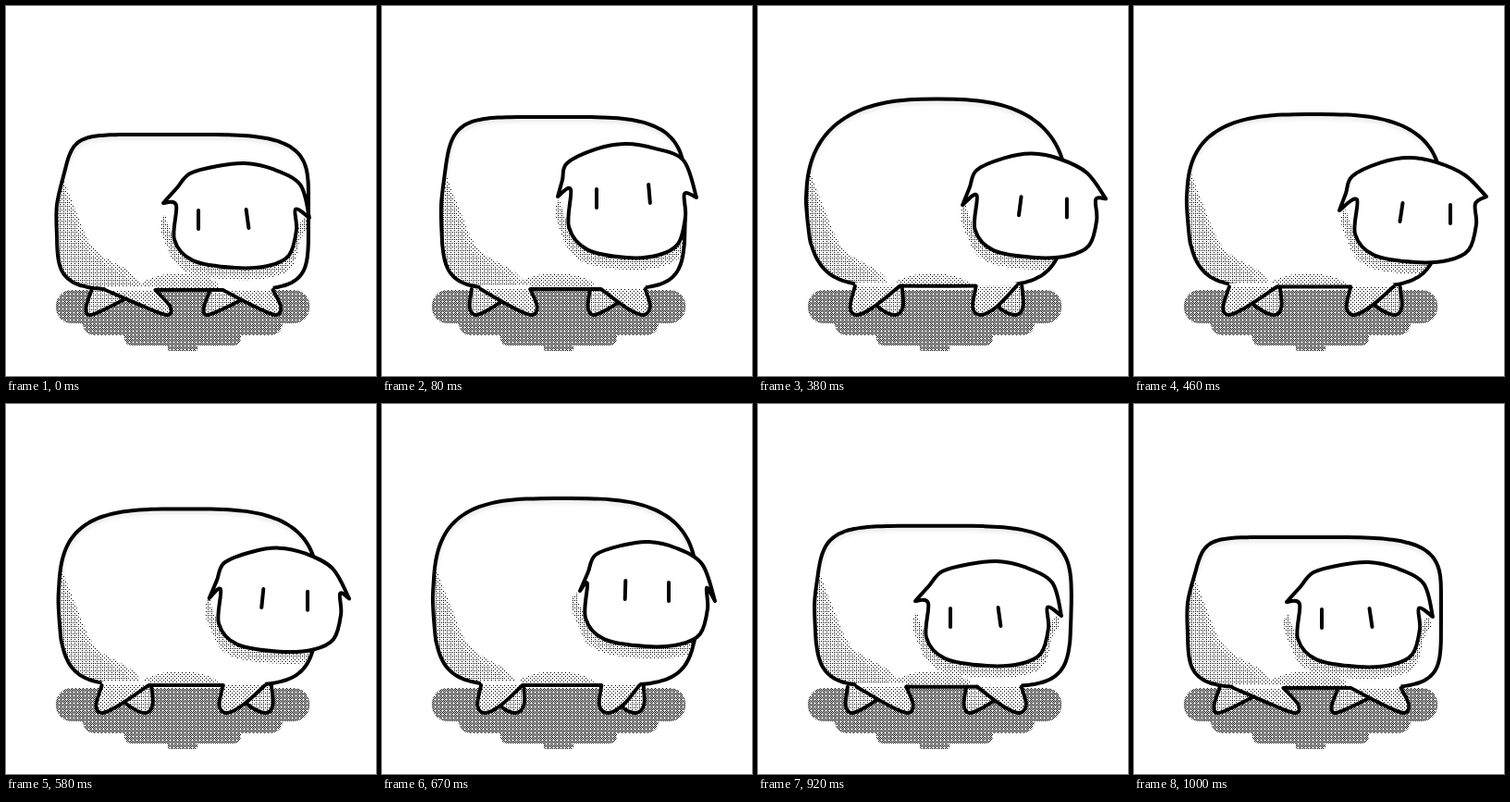
Recreate the animation shown at these times as an HTML page with a canvas. Size 400 px wide and 400 px high, loop 1.04 s.

```html
<!DOCTYPE html>
<html lang="en">
<head>
<meta charset="utf-8">
<title>Walking sheep</title>
<style>
html, body { margin: 0; width: 100%; height: 100%; overflow: hidden; background: #fff; }
canvas { display: block; }
</style>
</head>
<body>
<canvas id="stage" width="400" height="400"></canvas>
<script>
const ctx = document.getElementById('stage').getContext('2d');
const LOOP = 1040, TICKS = 25, DRAWINGS = 23, TURN = 10;
const mix = (a, b, u) => a + (b - a) * u;

// Body: drawing, [left, right, top, boxiness]
const bodyKeys = [
  [0, [55, 327, 139, 1]], [2, [64, 328, 120, 0.8]], [5, [46, 337, 76, 0]], [10, [57, 333, 117, 0.3]],
  [15, [55, 341, 102, 0.4]], [16.5, [53, 342, 73, 0]], [18, [62, 344, 112, 0.4]], [22, [58, 332, 144, 1]]
];

// Head: face left, top, right, bottom; then points: ear tips, crown corners, eyes
const headDown = [181, 170, 314, 283, 170, 213, 328, 229, 199, 181, 318, 193, 208, 231, 261, 230];
const headPoses = [
  [0, [238, 164, 370, 277, 222, 221, 381, 206, 236, 184, 358, 183, 289, 223, 342, 225]],
  [5, [219, 149, 352, 262, 214, 202, 360, 213, 231, 163, 346, 173, 263, 201, 310, 203]],
  [8, [201, 149, 328, 272, 190, 206, 340, 207, 200, 170, 326, 167, 232, 208, 289, 203]],
  [10, headDown],
  [11, headDown.map((v, i) => i % 2 ? v + 1 : v - 5)]
];
// The head swings back through the same poses
const headKeys = headPoses
  .flatMap(([gap, pose]) => (gap ? [TURN - gap, TURN + gap] : [TURN]).map(at => [(at + DRAWINGS) % DRAWINGS, pose]))
  .sort((a, b) => a[0] - b[0]);

// Cyclic cubic interpolation between poses
function poseAt(keys, time) {
  const n = keys.length;
  const key = i => [keys[(i + n) % n][0] + Math.floor(i / n) * DRAWINGS, keys[(i + n) % n][1]];
  let k = n - 1;
  while (keys[k][0] > time) k--;
  const [[ta, a], [tb, b], [tc, c], [td, d]] = [k - 1, k, k + 1, k + 2].map(key);
  const span = tc - tb, u = (time - tb) / span;
  return b.map((v, i) => {
    const m0 = (c[i] - a[i]) / (tc - ta) * span, m1 = (d[i] - v) / (td - tb) * span;
    return mix(v, c[i], u * u * (3 - 2 * u)) + m0 * u * (1 - u) ** 2 - m1 * u * u * (1 - u);
  });
}

// Smooth curve through points
function curve(points, closed = false, path = new Path2D()) {
  const n = points.length;
  const at = i => closed ? points[(i + n) % n] : points[Math.max(0, Math.min(n - 1, i))];
  path.moveTo(...at(0));
  for (let i = 0; i < n - (closed ? 0 : 1); i++) {
    const [a, b, c, d] = [at(i - 1), at(i), at(i + 1), at(i + 2)];
    path.bezierCurveTo(b[0] + (c[0] - a[0]) / 6, b[1] + (c[1] - a[1]) / 6,
      c[0] - (d[0] - b[0]) / 6, c[1] - (d[1] - b[1]) / 6, ...c);
  }
  if (closed) path.closePath();
  return path;
}

// Ordered halftone with the given number of black dots in each 4 by 4 cell
function halftone(level) {
  const tile = document.createElement('canvas');
  tile.width = tile.height = 4;
  const t = tile.getContext('2d');
  const quad = (x, y) => [0, 2, 3, 1][(y & 1) * 2 + (x & 1)];
  for (let y = 0; y < 4; y++) {
    for (let x = 0; x < 4; x++) {
      if (quad(x, y) * 4 + quad(x >> 1, y >> 1) < level) t.fillRect(x, y, 1, 1);
    }
  }
  return ctx.createPattern(tile, 'repeat');
}
const [light, mid, dark] = [2, 3, 7].map(halftone);

const ground = new Path2D();
for (const [half, bottom] of [[137, 343], [108, 356], [63, 367], [16, 373]]) {
  ground.roundRect(191 - half, 307, half * 2, bottom - 307, half / 8);
}

function fill(path, style) {
  ctx.fillStyle = style;
  ctx.fill(path);
}

function ink(path, width = 4, style = '#000') {
  ctx.strokeStyle = style;
  ctx.lineWidth = width;
  ctx.stroke(path);
}

function drawLeg(hip, swing, y, near) {
  const half = 15 + Math.min(12, Math.abs(swing) / 2);
  const foot = hip + swing;
  const root = hip + swing * (near ? 0.1 : 0.3);
  const path = curve([[root - half, y], [foot - 13, 326], [foot + swing * 0.3, 334], [foot + 13, 325], [root + half, y]]);
  fill(path, '#fff');
  if (near) {
    // Opens the belly line where the leg joins
    const join = new Path2D();
    join.moveTo(root - half, y);
    join.lineTo(root + half, y);
    ctx.lineCap = 'butt';
    ink(join, 8, '#fff');
    ctx.lineCap = 'round';
  }
  fill(path, near ? light : mid);
  ink(path);
}

// Superellipse that goes from a dome to a box leaning in at the rear
function bodyPath([left, right, top, box], bottom) {
  const points = [], cx = (left + right) / 2, cy = 215, half = (right - left) / 2;
  for (let i = 0; i < 96; i++) {
    const a = i / 48 * Math.PI, c = Math.cos(a), s = Math.sin(a);
    const rear = c < 0, below = s > 0;
    const power = below ? 6 : 2.5 + (rear ? 5.5 * box * box : 1.5 * box);
    const reach = Math.abs(c) ** (2 / power), v = Math.abs(s) ** (2 / power);
    const taper = below ? 0.18 * (1 - box) * v * v : rear ? 0.13 * box * box * v : 0;
    points.push([cx + Math.sign(c) * half * reach * (1 - taper), mix(cy, below ? bottom : top, v)]);
  }
  return curve(points, true);
}

function drawShade(left, face) {
  for (const [style, grow] of [[light, 8], [mid, 0]]) {
    const flank = curve([[left, 175 - grow], [left + 14 + grow / 2, 215], [left + 32 + grow, 262],
      [left + 72 + grow, 292 - grow / 2], [left + 88 + grow, 310]]);
    flank.lineTo(left - 20, 320);
    fill(flank, style);
    const cast = new Path2D();
    for (const dx of [-6, 3]) cast.addPath(curve(face.map(([x, y]) => [x + dx, y + 8 + grow * 0.6]), true));
    fill(cast, style);
  }
  const belly = new Path2D();
  belly.ellipse(188, 304, 42, 15, 0, 0, 7);
  fill(belly, light);
}

function drawBody(pose, bottom, face) {
  const path = bodyPath(pose, bottom);
  fill(path, '#fff');
  ctx.save();
  ctx.clip(path);
  drawShade(pose[0], face);
  ctx.shadowColor = 'rgba(0,0,0,.2)';
  ctx.shadowBlur = 5;
  ctx.shadowOffsetY = 3;
  ink(path, 2);
  ctx.restore();
  ink(path);
}

function headShape([left, top, right, bottom, lx, ly, rx, ry, clx, cly, crx, cry]) {
  const peak = (clx + crx) / 2;
  const y = part => mix(top, bottom, part);
  const crown = [
    [lx, ly], [(lx + clx) / 2, (ly + cly) / 2], [clx, cly], [(clx + peak) / 2, mix(top, cly, 0.27)], [peak, top],
    [(crx + peak) / 2, mix(top, cry, 0.27)], [crx, cry], [rx, ry]
  ];
  const face = [
    [right - 1, y(0.44)], [right, y(0.64)], [right - 8, y(0.88)], [right - 30, y(0.98)],
    [(left + right) / 2, y(1)], [left + 21, y(0.93)], [left + 1, y(0.73)], [left + 3, y(0.4)]
  ];
  return { crown, face };
}

function drawHead({ crown, face }, eyes, turn) {
  const outline = curve(crown);
  curve([crown[7], ...face, crown[0]], false, outline);
  const middle = new Path2D();
  [...crown, ...face].forEach(p => middle.lineTo(...p));
  for (const path of [middle, curve(crown), curve(face, true)]) fill(path, '#fff');
  ink(outline);
  const tilts = [-Math.max(0, turn), Math.max(0, -turn)];
  tilts.forEach((tilt, i) => {
    const x = eyes[i * 2], y = eyes[i * 2 + 1];
    ink(curve([[x - tilt * 1.5, y - 10], [x + tilt * 1.5, y + 10]]));
  });
}

function draw(now) {
  const hundredth = Math.floor(now % LOOP / 10);
  const tick = Math.ceil((hundredth + 0.5) * 6 / 25) - 1;
  const drawing = Math.floor((tick * DRAWINGS + 7) / TICKS);
  const cycle = 2 * Math.PI / DRAWINGS;
  const step = (drawing + 0.5) * cycle;
  const swing = 1 + 28 * Math.cos(step) + 5 * Math.cos(2 * step);
  const body = poseAt(bodyKeys, drawing), head = poseAt(headKeys, drawing);
  const shape = headShape(head), bottom = 302 + 5 * body[3];

  ctx.fillStyle = '#fff';
  ctx.fillRect(0, 0, 400, 400);
  ctx.lineCap = ctx.lineJoin = 'round';
  fill(ground, dark);
  drawLeg(128, swing * -0.85, bottom, false);
  drawLeg(257, swing * -0.9, bottom, false);
  drawBody(body, bottom, shape.face);
  drawLeg(131, swing, bottom, true);
  drawLeg(259, swing * 0.75, bottom, true);
  drawHead(shape, head.slice(12), Math.cos((drawing - TURN) * cycle));
}

let start;
function loop(now) {
  start ??= now;
  draw(now - start);
  requestAnimationFrame(loop);
}
requestAnimationFrame(loop);
</script>
</body>
</html>
```
